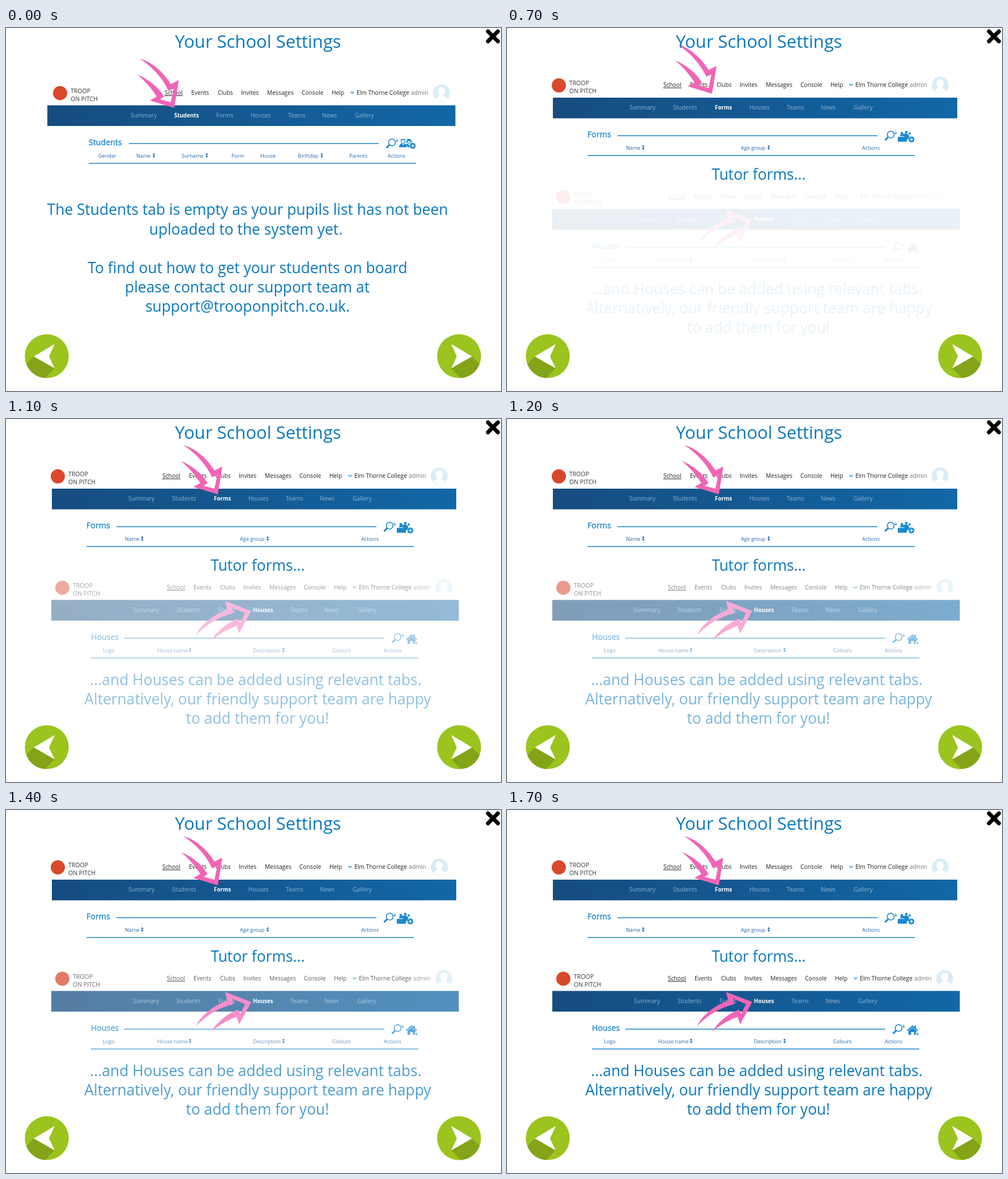
Animation of 874 by 641 pixels, one loop 5.7 s. Source, as an HTML page:

```html
<!DOCTYPE html>
<html lang="en">
<head>
<meta charset="utf-8">
<title>Your School Settings</title>
<style>
html, body { margin: 0; width: 100%; height: 100%; overflow: hidden; background: #fff; }
svg { display: block; font-family: "Open Sans", "Noto Sans", sans-serif; }
.big { font-size: 26.4px; fill: #0a78bd; text-anchor: middle; }
.nav { font-size: 10.3px; fill: #222; }
.sub { font-size: 10.3px; fill: #8db3d3; }
.on { font-size: 9.8px; font-weight: 700; fill: #fff; }
.head { font-size: 14.2px; fill: #1582cb; stroke: #1582cb; stroke-width: .3; }
.col { font-size: 9.1px; fill: #2269ae; }
.brand { font-size: 10.5px; font-stretch: 75%; fill: #333; }
.ico { fill: #1a88cf; }
.line { fill: none; stroke: #1a85cb; stroke-width: 1.6; }
</style>
</head>
<body>
<svg id="stage" width="874" height="641" viewBox="0 0 874 641">
  <defs>
    <linearGradient id="bar">
      <stop offset="0" stop-color="#164c7f"/>
      <stop offset="1" stop-color="#1267a6"/>
    </linearGradient>
    <path id="arrow" fill="#f164b6" d="M-61-87C-39-81-19-63-6-42L8-49L0 0L-43-13L-31-20C-39-33-49-45-65-59C-47-51-29-38-18-20L-25-15L-6-10L-1-34L-10-30C-21-53-37-71-61-87Z"/>
    <g id="lens">
      <circle class="line" cx="681.5" cy="202" r="6"/>
      <path class="line" style="stroke-width:3" d="M677 206.5L671.500 212"/>
      <path class="line" style="stroke-width:1" d="M690.500 196V201M688.500 199L690.500 201.500L692.500 199"/>
    </g>
    <g id="plus">
      <circle class="ico" cx="718" cy="208" r="5.500" stroke="#fff" stroke-width=".6"/>
      <path d="M715 208H721M718 205V211" stroke="#fff" stroke-width="1.400"/>
    </g>
    <g id="button">
      <circle cx="72" cy="579.5" r="38.8" fill="#9bc41e"/>
      <path fill="#83a418" d="M49 580L35.700 593.300A38.800 38.800 0 0 0 68.800 618.200L86 601L76 580Z"/>
      <path fill="#fff" d="M49 580L86 558L76 580L86 601Z"/>
    </g>
  </defs>
</svg>
<script>
const stage = document.getElementById('stage');

const text = (cls, x, y, s) => `<text class="${cls}" x="${x}" y="${y}">${s}</text>`;
const arrow = (x, y, turn = 0) => `<use href="#arrow" transform="translate(${x} ${y}) rotate(${turn})"/>`;
const rule = (x1, x2, y) => `<path class="line" d="M${x1} ${y}H${x2}"/>`;
const sorter = x =>
  `<path fill="#2269ae" d="M${x} 220.500l2.300 3h-1.700v2.500h1.700l-2.300 3l-2.300-3h1.700v-2.500h-1.700z"/>`;

const menu = [[280, 'School'], [327, 'Events'], [374, 'Clubs'], [415, 'Invites'],
  [461, 'Messages'], [522, 'Console'], [575, 'Help']];
const tabs = [[220, 'Summary'], [297, 'Students'], [371, 'Forms'], [432, 'Houses'],
  [498, 'Teams'], [558, 'News'], [616, 'Gallery']];

const icons = {
  Students: `<g class="ico">
    <circle cx="701" cy="200" r="3.500" fill="#fff" stroke="#1a88cf" stroke-width="1.200"/>
    <path d="M697 200v-3.500h8v3.500l-1.500-2h-5zM694 210.500q0-6 5-6.500l2 3l2-3q4 .5 5 6.500z"/>
    <circle cx="711.500" cy="200" r="3.500" fill="#fff" stroke="#1a88cf" stroke-width="1.200"/>
    <path d="M706.500 204q0-8 5-8t5.500 8l-2.500-4.500h-5zM706 205l4-.5l2 3l3-3q4 .5 4.500 6h-10z"/>
    </g><use href="#plus"/>`,
  Forms: `<g class="ico"><path d="M694 206h16v8.500h-16z"/>
    <path d="M698 205q0-4 3.500-4t3.500 4zM705 205q0-5 4-5t5 5l1 5h-6z"/>
    <circle cx="701" cy="199.500" r="2.200"/><circle cx="709" cy="197.500" r="2.300"/>
    <circle cx="715" cy="200" r="2"/><circle cx="705" cy="202" r="2"/>
    </g><use href="#plus" y="2.500"/>`,
  Houses: `<path class="ico" d="M696 206l10-9l3.500 3v-2h2.500v4.500l4 3.500l-1.500 1.500l-8.500-7.500l-8.500 7.500z
    M699 207l7-6l7 6v3h-1.500v4h-3v-5h-5v5H699z"/>
    <path class="line" style="stroke-width:1" d="M712 212.500h5M714.500 210v5"/>`
};

// One school page: header, tab bar and empty table, shifted by dx, dy
function page(name, dx, dy, bar, ruleX, iconX, cols) {
  return `<rect x="${bar[0]}" y="${bar[1]}" width="${bar[2]}" height="36.500" fill="url(#bar)"/>
  <g transform="translate(${dx} ${dy})">
    <circle cx="95.500" cy="115" r="12.500" fill="#d9482b"/>
    ${text('brand', 114, 115, 'TROOP')}${text('brand', 114, 128.5, 'ON PITCH')}
    ${menu.map(([x, s]) => text('nav', x, s == 'Help' ? 118 : 117.5, s)).join('')}
    <path d="M280 119.500H312" stroke="#222"/>
    <path d="M608.500 112.500l3 3l3-3" fill="none" stroke="#2a8fd0" stroke-width="1.300"/>
    ${text('nav', 619, 117.5, 'Elm Thorne College')}
    <text class="nav" x="715" y="117.500" style="fill:#777">admin</text>
    <circle cx="769" cy="114.500" r="15" fill="#d9edf6"/>
    <path fill="#fff" d="M769 104.500c8.500 0 7 11.500 3 14.500c1 2.500 6 2 7.500 5.500q-10.500 9-21 0c1.500-3.500 6.500-3 7.500-5.500c-4-3-5.500-14.500 3-14.500z"/>
    ${tabs.map(([x, s]) => text(s == name ? 'on' : 'sub', x, 157.5, s)).join('')}
    ${text('head', 146, 207, name)}
    ${rule(...ruleX, 204)}${rule(146, 724, 239)}
    <g transform="translate(${iconX} 0)"><use href="#lens"/>${icons[name]}</g>
    ${cols.map(([x, s, mark]) => text('col', x, 228.5, s) + (mark ? sorter(mark) : '')).join('')}
  </g>`;
}

const lines = rows => rows.map(([x, y, s]) => text('big', x, y, s)).join('');

stage.innerHTML += `
<g id="students">
  ${page('Students', 0, 0, [73, 136.5, 720.5], [217, 658], 0, [
    [163, 'Gender'], [230, 'Name', 261], [310, 'Surname', 354.5], [398, 'Form'],
    [449, 'House'], [515, 'Birthday', 557.5], [606, 'Parents'], [674, 'Actions']])}
  ${arrow(297, 141)}
  ${lines([
    [426.5, 330, 'The Students tab is empty as your pupils list has not been'],
    [423.5, 364.5, 'uploaded to the system yet.'],
    [426.5, 432.5, 'To find out how to get your students on board'],
    [426, 467, 'please contact our support team at'],
    [426.5, 501, 'support@trooponpitch.co.uk.']])}
</g>
<g id="forms">
  ${page('Forms', -4, -13.7, [81, 123, 714], [199, 658], 0, [
    [214, 'Name', 244.5], [417, 'Age group', 466], [631, 'Actions']])}
  <g id="tutor">${text('big', 438.5, 271.5, 'Tutor forms...')}</g>
  <g id="pointer">${arrow(374, 133)}</g>
</g>
<g id="houses">
  ${page('Houses', 4, 183, [80, 319.5, 719.5], [205, 664], 6, [
    [167, 'Logo'], [263, 'House name', 321], [432, 'Description', 486],
    [572, 'Colours'], [663, 'Actions']])}
  ${arrow(433, 339, -78.4)}
  ${lines([
    [441, 469.5, '...and Houses can be added using relevant tabs.'],
    [444.5, 503.5, 'Alternatively, our friendly support team are happy'],
    [444, 538, 'to add them for you!']])}
</g>
<text class="big" x="445" y="35" style="font-size:31px">Your School Settings</text>
<path d="M851 6L868.500 23.500M868.500 6L851 23.500" stroke="#000" stroke-width="7" stroke-linecap="round"/>
<use href="#button"/>
<use href="#button" transform="translate(872 0) scale(-1 1)"/>`;

const part = id => document.getElementById(id);
const [students, forms, tutor, pointer, houses] =
  ['students', 'forms', 'tutor', 'pointer', 'houses'].map(part);
const clamp = v => Math.max(0, Math.min(1, v));
const show = (el, on) => el.setAttribute('display', on ? 'inline' : 'none');
const move = (el, x, y) => el.setAttribute('transform', `translate(${x} ${y})`);

const LOOP = 5700, STEP = 100;
const start = performance.now();

function draw() {
  const t = Math.floor((performance.now() - start) % LOOP / STEP) * STEP;
  const settled = t >= 600;
  const away = 1 - clamp((t - 600) / 200);
  show(students, t < 500);
  show(forms, t >= 500);
  show(pointer, settled);
  show(houses, settled);
  move(tutor, settled ? 6 : 0, settled ? -4 : 0);
  move(pointer, -24 * away, -34 * away);
  houses.setAttribute('opacity', clamp((t - 600) / 1100));
  requestAnimationFrame(draw);
}
draw();
</script>
</body>
</html>
```
